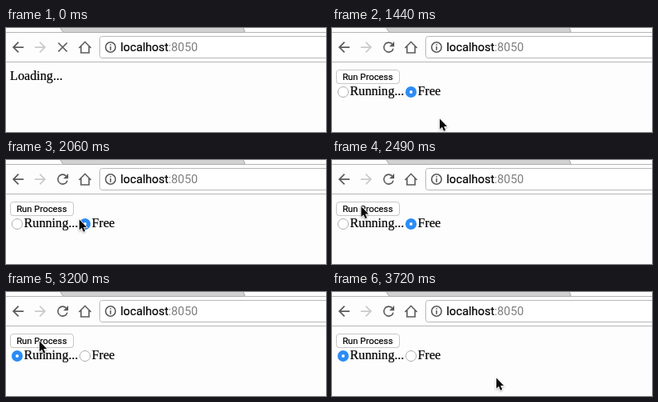
An HTML page for the animation above (8000 ms loop, 401 by 130 pixels).

```html
<!DOCTYPE html>
<html lang="en">
<head>
<meta charset="utf-8">
<title>Run Process</title>
<style>
  html, body { margin: 0; width: 100%; height: 100%; overflow: hidden; background: #fdfdfd; }
  svg { display: block; width: 100%; height: 100%; }
  text { stroke: currentColor; stroke-width: .2; }
  .ui { font-family: Roboto, "Liberation Sans", sans-serif; }
  .page { font: 16.2px "Liberation Serif", "Noto Serif", serif; }
  .icon { fill: none; stroke: #5a5a5a; stroke-width: 1.6; }
  #cursor { filter: drop-shadow(0 1px 1px rgba(0, 0, 0, .3)); }
</style>
</head>
<body>
<svg viewBox="0 0 401 130">
  <defs>
    <linearGradient id="pressed" x2="0" y2="1">
      <stop stop-color="#4d9bfa"/>
      <stop offset="1" stop-color="#0a5fe8"/>
    </linearGradient>
    <circle id="radio-off" r="6.5" fill="#fff" stroke="#adadad"/>
    <g id="radio-on">
      <circle r="7" fill="#2b8cf5"/>
      <circle r="1.9" fill="#fff"/>
    </g>
    <path id="arrow" d="M20 11H7.83l5.59-5.59L12 4l-8 8 8 8 1.41-1.41L7.83 13H20z"/>
  </defs>

  <rect width="401" height="130" fill="#fdfdfd"/>

  <!-- tab strip and toolbar -->
  <path d="M0 5.5H401" stroke="#b4b4b4"/>
  <path d="M68 -.5L70.500 4Q71.500 5.500 74 5.500H297Q300 5.500 299 3L297 -.5Z" fill="#d2d2d2" stroke="#a9a9a9"/>
  <path d="M0 42.500H401" stroke="#b6b6b6"/>

  <use href="#arrow" transform="translate(4.500 13.500) scale(.875)" fill="#5a5a5a"/>
  <use href="#arrow" transform="translate(53.500 13.500) scale(-.875 .875)" fill="#cacaca"/>
  <path id="stop" class="icon" d="M65.500 18.500L76.500 29.500M76.500 18.500L65.500 29.500"/>
  <g id="reload">
    <path class="icon" d="M75.300 19.900A6 6 0 1 0 76.800 25.700"/>
    <path d="M78 17V23.200H71.800Z" fill="#5a5a5a"/>
  </g>
  <path class="icon" d="M91.500 25L99 17.300L106.500 25M94 23V31H104V23"/>

  <rect x="117.500" y="10.500" width="300" height="27" rx="3" fill="#fff" stroke="#b8b8b8"/>
  <circle class="icon" cx="131" cy="24" r="6.200"/>
  <path class="icon" d="M131 20.200V21.800M131 23V27.800"/>
  <text class="ui" x="143.500" y="29" font-size="14.700">localhost<tspan fill="#7d7d7d" stroke="none">:8050</tspan></text>

  <!-- page -->
  <text id="loading" class="page" x="5" y="65">Loading...</text>
  <g id="app">
    <rect x="5.500" y="53" width="79" height="17" rx="3.500" fill="#d9d9d9"/>
    <rect id="button" x="5.500" y="52.500" width="79" height="17" rx="3.500"/>
    <text class="ui" x="44.700" y="65" font-size="11.300" text-anchor="middle">Run Process</text>
    <use id="running" x="14" y="80"/>
    <text class="page" x="22.500" y="84">Running...</text>
    <use id="free" x="99" y="80"/>
    <text class="page" x="107.500" y="84">Free</text>
  </g>
  <path id="cursor" d="M0 1.500V14.500L3 11.800L5.100 16.700L7.300 15.700L5.200 10.900H9.200Z"
    fill="#0a0a0a" stroke="#fff" stroke-width="1.500" paint-order="stroke"/>
</svg>
<script>
  const LOOP = 8000, STEP = 88;
  const $ = id => document.getElementById(id);
  const show = (id, on) => $(id).setAttribute("visibility", on ? "visible" : "hidden");

  // Pointer strokes: cubic curves followed in even time steps.
  const strokes = [
    { start: 1350, end: 2150, curve: [[146, 121], [105, 91], [143, 92], [72, 65]] },
    { start: 2230, end: 2850, curve: [[54, 60], [30, 55], [19, 54], [18, 54]] },
    { start: 3200, end: 3720, curve: [[42, 60], [200, 99], [200, 104], [206, 106]] }
  ];

  const mix = (a, b, u) => a.map((v, i) => v + (b[i] - v) * u);

  function bezier(points, u) {
    while (points.length > 1) {
      points = points.slice(1).map((p, i) => mix(points[i], p, u));
    }
    return points[0];
  }

  function pointerAt(t) {
    const stroke = strokes.filter(s => t >= s.start).pop();
    if (!stroke) return null;
    const span = stroke.end - stroke.start;
    const steps = Math.round(span / STEP);
    const u = Math.floor((t - stroke.start + 4) / span * steps) / steps;
    return bezier(stroke.curve, Math.min(1, u));
  }

  function draw(t) {
    const loaded = t >= 720;
    const busy = t >= 3200;
    const down = t >= 2850 && t < 3030;
    const pointer = pointerAt(t);

    show("stop", t < 270);
    show("reload", t >= 270);
    show("loading", !loaded);
    show("app", loaded);

    $("button").setAttribute("fill", down ? "url(#pressed)" : "#fff");
    $("button").setAttribute("stroke", down ? "#2467cf" : "#c6c6c6");
    $("running").setAttribute("href", busy ? "#radio-on" : "#radio-off");
    $("free").setAttribute("href", t >= 1170 && !busy ? "#radio-on" : "#radio-off");

    show("cursor", pointer);
    if (pointer) $("cursor").setAttribute("transform", `translate(${pointer})`);
  }

  const origin = performance.now();
  function tick() {
    draw((performance.now() - origin) % LOOP);
    requestAnimationFrame(tick);
  }
  tick();
</script>
</body>
</html>
```
